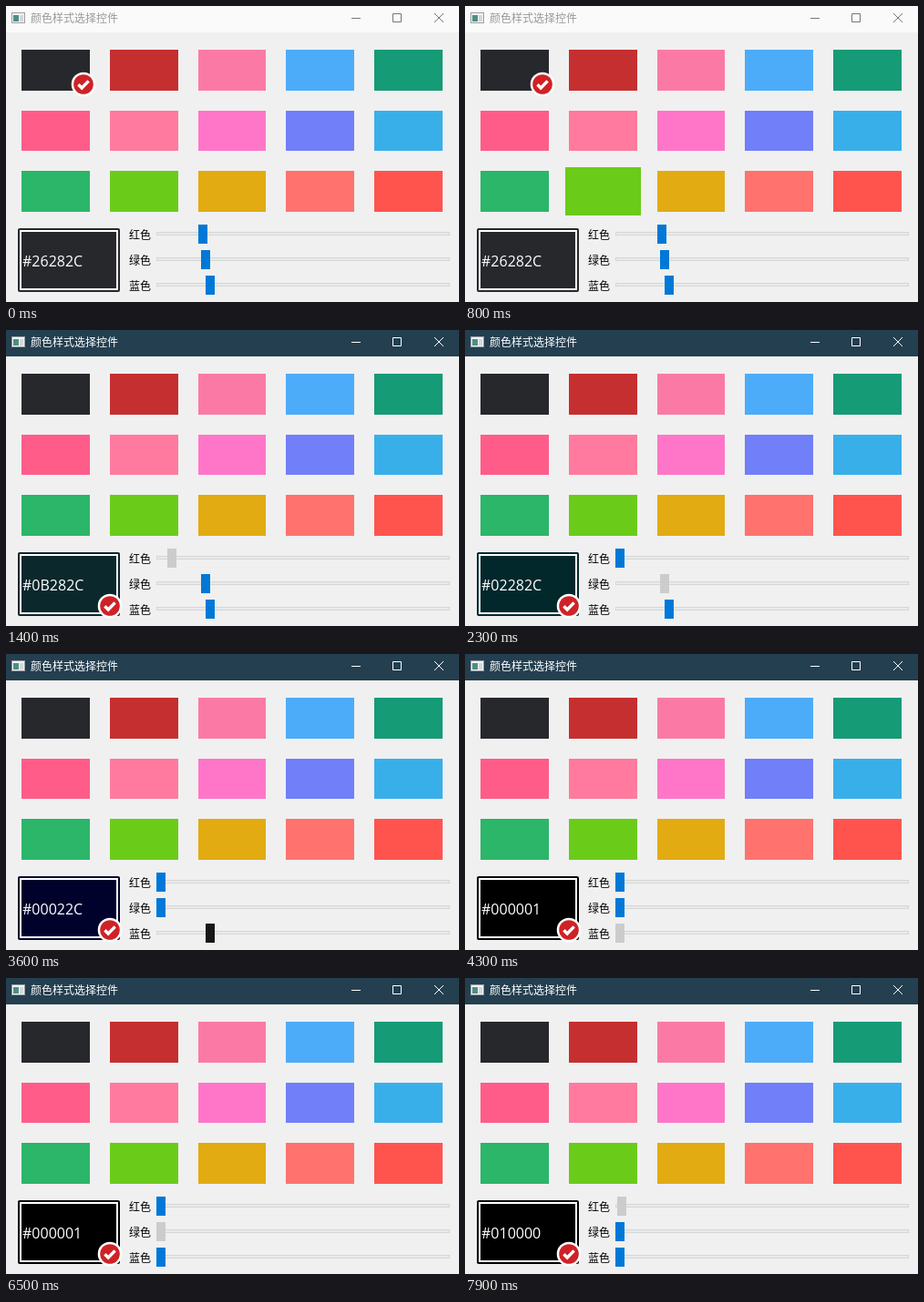
Animation of 497 by 325 pixels, one loop 8 s. Source, as an HTML page:

```html
<!DOCTYPE html>
<html lang="zh">
<head>
<meta charset="utf-8">
<title>颜色样式选择控件</title>
<style>
html, body { margin: 0; width: 100%; height: 100%; overflow: hidden; background: #f0f0f0; }
svg { display: block; }
text { font: 12px "Noto Sans CJK SC", "Noto Sans CJK", sans-serif; white-space: pre; }
#hex { font: 16px "Open Sans", "Noto Sans", sans-serif; fill: #fff; }
.crisp { shape-rendering: crispEdges; }
#bar { fill: #fafafa; }
#title { fill: #999; }
#buttons { stroke: #777; fill: none; }
.active #bar { fill: #243f50; }
.active #title { fill: #fff; }
.active #buttons { stroke: #fff; }
</style>
</head>
<body>
<svg id="stage" width="497" height="325" viewBox="0 0 497 325">
  <rect width="497" height="325" fill="#f0f0f0"/>
  <rect id="bar" width="497" height="29"/>
  <g class="crisp">
    <rect x="6" y="7" width="15" height="12" fill="#9a9fa3"/>
    <rect x="7" y="8" width="13" height="10" fill="#f4f4f4"/>
    <rect x="8" y="10" width="6" height="7" fill="#4b8f86"/>
    <rect x="15" y="10" width="4" height="7" fill="#d3d7d9"/>
  </g>
  <text id="title" x="27" y="18">颜色样式选择控件</text>
  <g id="buttons">
    <path d="M379 13.5h10M424.5 8.5h9v9h-9z"/>
    <path d="M470 8l10 10M480 8l-10 10"/>
  </g>
  <g id="swatches" class="crisp"></g>
  <rect id="frame" x="13" y="244" width="112" height="70" rx="2"/>
  <rect id="fill" x="16" y="247" width="106" height="64" stroke="#fff" stroke-width="2"/>
  <text id="hex" x="18" y="286"></text>
  <g id="sliders"></g>
  <g id="check">
    <circle r="13.3" fill="#fff"/>
    <circle r="10.8" fill="#cf2226"/>
    <path d="M-5.6 .2L-1.8 4L5.6 -3.6" fill="none" stroke="#fff" stroke-width="3.4"/>
  </g>
</svg>
<script>
const $ = id => document.getElementById(id);

function add(parent, tag, attrs) {
  const el = document.createElementNS("http://www.w3.org/2000/svg", tag);
  set(el, attrs);
  parent.append(el);
  return el;
}

function set(el, attrs) {
  for (const k in attrs) el.setAttribute(k, attrs[k]);
}

const COLORS = [
  "#26282c", "#c62f2f", "#fb7aa5", "#4cacf9", "#169b77",
  "#ff5c8a", "#ff7a9e", "#ff76c8", "#717ff9", "#39afea",
  "#2bb669", "#6acc19", "#e2ab12", "#ff726d", "#ff544e"
];
const COLS = [[17, 75], [114, 75], [211, 74], [307, 75], [404, 75]];
const ROWS = [[48, 45], [115, 44], [181, 45]];

const swatches = COLORS.map((fill, i) => {
  const [x, width] = COLS[i % 5], [y, height] = ROWS[Math.floor(i / 5)];
  return { x, y, width, height, el: add($("swatches"), "rect", { fill }) };
});

const handles = ["红色", "绿色", "蓝色"].map((label, i) => {
  const y = 240 + 28 * i, box = $("sliders");
  add(box, "text", { x: 135, y: y + 16 }).textContent = label;
  add(box, "rect", { x: 165.5, y: y + 8.5, width: 321, height: 3, fill: "#e7eaea", stroke: "#d6d6d6" });
  return add(box, "rect", { y, width: 10, height: 21, class: "crisp" });
});

const IDLE = "#0078d7", HOVER = "#171717", PRESS = "#ccc";

// Each step changes part of the state; r, g, b are [handle x, handle colour].
const STEPS = [
  [0, { active: false, hover: -1, custom: false, hex: "#26282C", r: [211, IDLE], g: [214, IDLE], b: [219, IDLE] }],
  [100, { hover: 12 }],
  [200, { hover: -1 }],
  [400, { hover: 0 }],
  [700, { hover: 6 }],
  [800, { hover: 11 }],
  [900, { hover: -1, g: [214, HOVER] }],
  [1000, { g: [214, IDLE], r: [211, HOVER] }],
  [1200, { active: true, r: [211, PRESS] }],
  [1300, { custom: true, r: [195, PRESS], hex: "#1A282C" }],
  [1400, { r: [177, PRESS], hex: "#0B282C" }],
  [1500, { r: [165, PRESS], hex: "#02282C" }],
  [1700, { r: [165, IDLE] }],
  [2100, { g: [214, HOVER] }],
  [2300, { g: [214, PRESS] }],
  [2400, { g: [210, PRESS], hex: "#00262C" }],
  [2500, { g: [203, PRESS], hex: "#00202C" }],
  [2600, { g: [195, PRESS], hex: "#00192C" }],
  [2700, { g: [186, PRESS], hex: "#00122C" }],
  [2800, { g: [176, PRESS], hex: "#000A2C" }],
  [2900, { g: [165, PRESS], hex: "#00022C" }],
  [3100, { g: [165, IDLE] }],
  [3600, { b: [219, HOVER] }],
  [3800, { b: [219, PRESS] }],
  [3900, { b: [211, PRESS], hex: "#000026" }],
  [4000, { b: [200, PRESS], hex: "#00001D" }],
  [4100, { b: [189, PRESS], hex: "#000014" }],
  [4200, { b: [177, PRESS], hex: "#00000B" }],
  [4300, { b: [165, PRESS], hex: "#000001" }],
  [5100, { b: [165, IDLE] }],
  [5500, { b: [165, HOVER] }],
  [5600, { b: [165, IDLE] }],
  [6100, { b: [165, HOVER] }],
  [6200, { b: [165, IDLE], g: [165, HOVER] }],
  [6500, { g: [165, PRESS] }],
  [6700, { g: [170, PRESS], hex: "#000300" }],
  [6800, { g: [175, PRESS], hex: "#000700" }],
  [6900, { g: [170, PRESS], hex: "#000500" }],
  [7000, { g: [165, PRESS], hex: "#000100" }],
  [7300, { g: [165, IDLE] }],
  [7700, { r: [165, HOVER] }],
  [7800, { r: [165, PRESS] }],
  [7900, { r: [167, PRESS], hex: "#010000" }]
];

function draw(s) {
  $("stage").classList.toggle("active", s.active);
  swatches.forEach(({ x, y, width, height, el }, i) => {
    const d = i === s.hover ? 4 : 0;
    set(el, { x: x - d, y: y - d, width: width + 2 * d, height: height + 2 * d });
  });
  [s.r, s.g, s.b].forEach(([x, fill], i) => set(handles[i], { x, fill }));
  set($("frame"), { fill: s.hex });
  set($("fill"), { fill: s.hex });
  $("hex").textContent = s.hex;
  set($("check"), { transform: s.custom ? "translate(114 303)" : "translate(85 86)" });
}

let shown = -1;
const start = performance.now();

function tick() {
  const t = (performance.now() - start) % 8000;
  const count = STEPS.filter(([at]) => at <= t).length;
  if (count !== shown) {
    shown = count;
    draw(Object.assign({}, ...STEPS.slice(0, count).map(step => step[1])));
  }
  requestAnimationFrame(tick);
}
tick();
</script>
</body>
</html>
```
